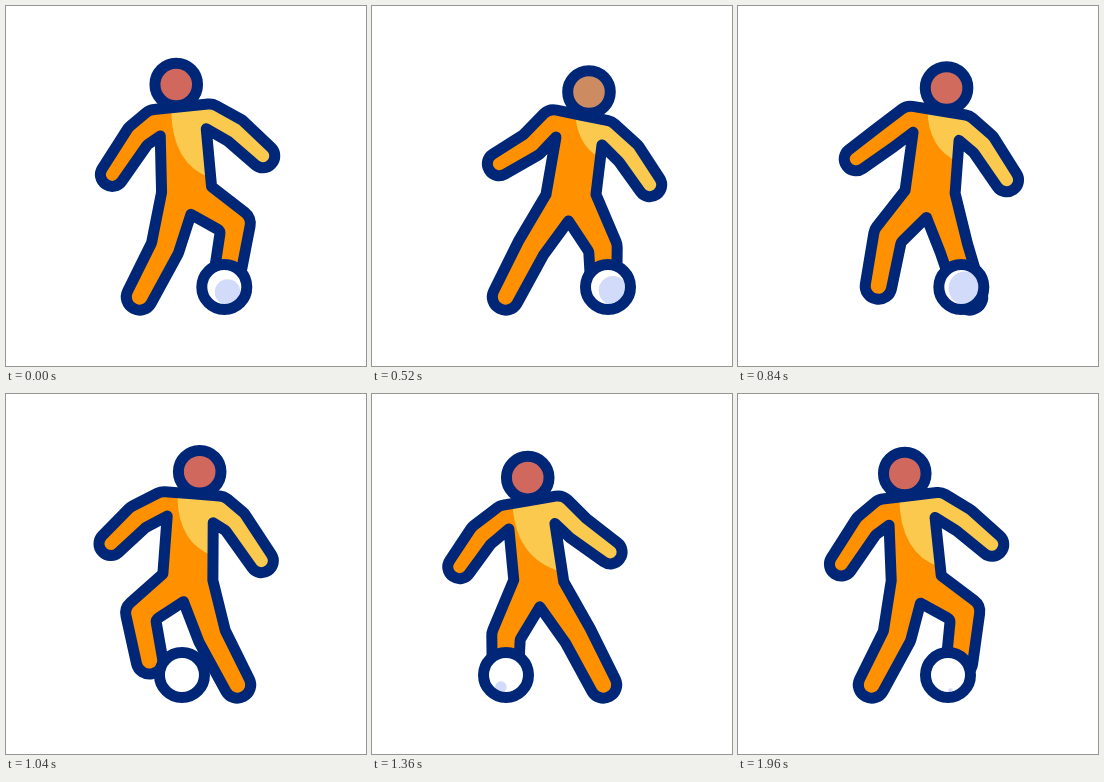
An HTML page with a canvas that plays this animation: 360x360 px, repeating every 2000 ms.

```html
<!DOCTYPE html>
<html lang="en">
<head>
<meta charset="utf-8">
<title>Footballer</title>
<style>
html, body { margin: 0; height: 100%; overflow: hidden; background: #fff; }
canvas { display: block; width: 100vmin; height: 100vmin; }
</style>
</head>
<body>
<canvas id="stage" width="360" height="360"></canvas>
<script>
const ctx = document.getElementById('stage').getContext('2d');
const LOOP = 2000, STEP = 40, MIRROR = 365;
const NAVY = '#002677', ORANGE = '#ff9100', YELLOW = '#fac94e', LILAC = '#d3dbfb';
const SKIN = [208, 104, 94], TAN = [204, 139, 97];

// Left-hand joints: x = x0 + lean·xl + swing·xs, y = y0 + lean·yl + lean²·yq + swing·ys
const joints = {
  shoulder: { x0: 151, xl: 26, xs: 4, y0: 99, yl: -6.5, yq: 10, ys: .5 },
  armpit: { x0: 159.5, xl: 24.5, xs: 6, y0: 124.5, yl: -4, yq: 10.5, ys: 2.4 },
  elbow: { x0: 134, xl: 25.5, xs: 10.5, y0: 124, yl: -4.5, yq: 19, ys: 1 },
  hand: { x0: 107, xl: 20, xs: 9, y0: 157.5, yl: -10.5, yq: 11, ys: 6 },
  waist: { x0: 157.5, xl: 16.5, xs: 6, y0: 182.5, yl: 0, yq: 6, ys: 3.5 }
};

const mix = (a, b, f) => a.map((v, k) => v + (b[k] - v) * f);
const unit = ([x, y]) => { const l = Math.hypot(x, y); return [x / l, y / l]; };
const toward = (a, b) => unit([b[0] - a[0], b[1] - a[1]]);

// Smooth rise from 0 to 1 between times a and b
function ramp(t, a, b) {
  const u = Math.min(1, Math.max(0, (t - a) / (b - a)));
  return u * u * (3 - 2 * u);
}

// One half of the body; the right half mirrors the left, half a loop apart
function half(side, t, lean, swing) {
  const l = side * lean, s = side * swing;
  const place = (x, y) => [side > 0 ? x : MIRROR - x, y];
  const p = {};
  for (const name in joints) {
    const { x0, xl, xs, y0, yl, yq, ys } = joints[name];
    p[name] = place(x0 + xl * l + xs * s, y0 + yl * l + yq * l * l + ys * s);
  }
  const step = side > 0 ? t : (t + LOOP / 2) % LOOP;
  p.knee = place(
    159 - 25 * (ramp(step, 700, 1040) - ramp(step, 1680, 1960)),
    242 - 24 * (ramp(step, 700, 980) - ramp(step, 980, 1340)));
  p.foot = place(
    133.5 + 10 * (ramp(step, 650, 950) - ramp(step, 1050, 1350)),
    291 - 24 * (ramp(step, 700, 1000) - ramp(step, 1540, 1680)));
  return p;
}

// Outline corners [x, y, radius] of a bent limb with a round end
function limb(a, b, joint, end, r) {
  const u = toward(mix(a, b, .5), joint), v = toward(joint, end);
  const m = unit([u[0] + v[0], u[1] + v[1]]);
  const w = 1.1 * r / (m[0] * v[0] + m[1] * v[1]);
  const turn = u[0] * v[1] - u[1] * v[0];
  const bend = s => [joint[0] - s * m[1] * w, joint[1] + s * m[0] * w, s * turn > 0 ? 5 : 14];
  const tip = s => [end[0] + r * (v[0] - s * v[1]), end[1] + r * (v[1] + s * v[0]), r - .01];
  return [bend(1), tip(1), tip(-1), bend(-1)];
}

function bodyPath(L, R, crotch) {
  const corners = [
    [...L.shoulder, 14], ...limb(L.shoulder, L.armpit, L.elbow, L.hand, 11.5),
    L.armpit, L.waist, ...limb(L.waist, crotch, L.knee, L.foot, 13),
    crotch, ...limb(crotch, R.waist, R.knee, R.foot, 13),
    R.waist, R.armpit, ...limb(R.armpit, R.shoulder, R.elbow, R.hand, 11.5),
    [...R.shoulder, 14]
  ];
  const path = new Path2D();
  path.moveTo(...mix(L.shoulder, R.shoulder, .5));
  corners.forEach(([x, y, r = 0], i) => {
    const next = corners[(i + 1) % corners.length];
    path.arcTo(x, y, next[0], next[1], r);
  });
  path.closePath();
  return path;
}

// Lit side: right of a curve from neck (x) to flank (y), above the right leg
function lightPath(x, y, armpit, waist) {
  const path = new Path2D();
  path.moveTo(x, 0);
  path.lineTo(x, 104);
  path.quadraticCurveTo(x + 1, y - 13, ...mix(armpit, waist, (y - armpit[1]) / (waist[1] - armpit[1])));
  path.lineTo(...armpit);
  path.lineTo(armpit[0] + 80, armpit[1] + 100);
  path.lineTo(360, armpit[1] + 100);
  path.lineTo(360, 0);
  return path;
}

function disc(x, y, r) {
  const path = new Path2D();
  path.arc(x, y, r, 0, 7);
  return path;
}

function paint(shape, fill, inner, innerFill) {
  ctx.fillStyle = fill;
  ctx.fill(shape);
  if (inner) {
    ctx.save();
    ctx.clip(shape);
    ctx.fillStyle = innerFill;
    ctx.fill(inner);
    ctx.restore();
  }
  ctx.stroke(shape);
}

function drawBody(t) {
  const w = 2 * Math.PI * t / LOOP;
  const phase = w - .23 - .2 * Math.cos(2 * w);
  const lean = Math.sin(phase), swing = Math.cos(phase) * Math.abs(Math.cos(phase));
  const L = half(1, t, lean, swing), R = half(-1, t, lean, swing);
  const crotch = [MIRROR / 2 + 14 * lean + 10 * swing, 207 + 8 * lean * lean];
  const neck = (L.shoulder[0] + R.shoulder[0]) / 2;
  const light = lightPath(neck - 12 + 7 * Math.cos(w - 1.25), 166 - 14 * lean, R.armpit, R.waist);
  paint(bodyPath(L, R, crotch), ORANGE, light, YELLOW);
  const skin = mix(SKIN, TAN, Math.max(0, lean) ** 8).map(Math.round);
  paint(disc(184 + 33 * lean, 77 + 9 * lean * lean, 21.3), `rgb(${skin})`);
}

function drawBall(t) {
  const u = t < 300 ? t + LOOP : t;
  const x = 134 + 102 * (1 - ramp(u, 710, 1300) + ramp(u, 1548, 2163));
  // The patch turns in and out of view as the ball rolls
  const r = 18 * Math.max(0, Math.cos((x - 228) / 12.5));
  paint(disc(x, 281, 22.5), '#fff', disc(x + (x - 185) / 10, 299 - r, r), LILAC);
}

function draw(now) {
  const t = Math.floor(now % LOOP / STEP) * STEP;
  ctx.fillStyle = '#fff';
  ctx.fillRect(0, 0, 360, 360);
  ctx.strokeStyle = NAVY;
  ctx.lineWidth = 11;
  ctx.lineJoin = 'round';
  drawBody(t);
  drawBall(t);
}

const start = performance.now();
function tick() {
  draw(performance.now() - start);
  requestAnimationFrame(tick);
}
tick();
</script>
</body>
</html>
```
